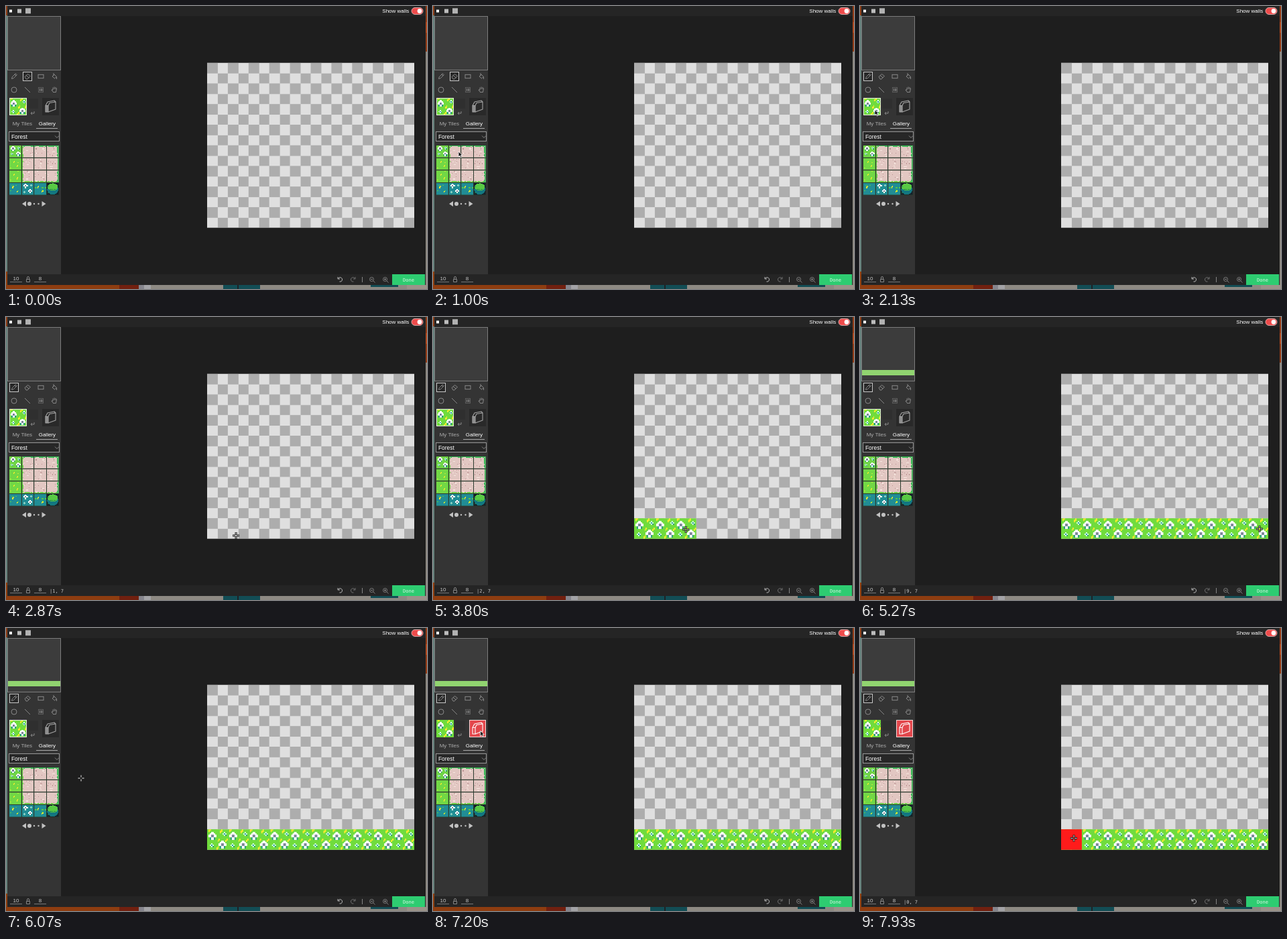
An HTML page that plays this animation: 628 by 422 pixels, repeating every 8 s.

```html
<!DOCTYPE html>
<html lang="en">
<head>
<meta charset="utf-8">
<title>Tile editor</title>
<style>
  html, body { margin: 0; width: 100%; height: 100%; overflow: hidden; background: #1e1e1e; }
  svg { display: block; }
  text { font: 8px "Liberation Sans", Arial, sans-serif; fill: #fff; }
  .mono { font: 7px "DejaVu Sans Mono", monospace; fill: #c4c4c4; }
  .line { fill: none; stroke: #909090; stroke-width: .9; }
  .crisp { shape-rendering: crispEdges; }
</style>
</head>
<body>
<svg width="628" height="422" viewBox="0 0 628 422">
  <defs>
    <symbol id="meadow" viewBox="0 0 16 16" class="crisp"></symbol>
    <pattern id="grass" x="300" y="300.2" width="30.9" height="30.75" patternUnits="userSpaceOnUse">
      <use href="#meadow" width="30.9" height="30.75"/>
    </pattern>
    <pattern id="checker" x="300" y="84.7" width="30.9" height="30.75" patternUnits="userSpaceOnUse">
      <path class="crisp" fill="#adadad" d="M0 0h31v31h-31z"/>
      <path class="crisp" fill="#dfdfdf" d="M15.45 0h15.45v15.375h-15.45zM0 15.375h15.45v15.375h-15.45z"/>
    </pattern>
  </defs>

  <!-- page behind the editor -->
  <g class="crisp">
    <rect width="628" height="422" fill="#8e8a83"/>
    <rect width="2" height="422" fill="#67837e"/>
    <rect width="2" height="14" fill="#8f4019"/>
    <rect y="396" width="2" height="26" fill="#92400f"/>
    <rect y="416" width="169" height="6" fill="#8e3d10"/>
    <rect x="169" y="416" width="29" height="6" fill="#71200f"/>
    <rect x="198" y="416" width="8" height="6" fill="#85858d"/>
    <rect x="206" y="416" width="10" height="6" fill="#a3a3a6"/>
    <rect x="324" y="416" width="55" height="6" fill="#124d55"/>
    <rect x="345" y="416" width="2" height="6" fill="#1d2226"/>
    <rect x="544" y="416" width="41" height="3" fill="#124d55"/>
    <rect x="598" y="416" width="30" height="6" fill="#9b938a"/>
    <rect x="625" width="3" height="68" fill="#943c17"/>
    <rect x="625" y="24" width="3" height="16" fill="#b34b21"/>
  </g>

  <!-- panels -->
  <g class="crisp">
    <rect x="2" width="624" height="416" fill="#1e1e1e"/>
    <rect x="2" width="624" height="15" fill="#252525"/>
    <rect x="2" y="15" width="80" height="385" fill="#343434"/>
    <rect x="2" y="400" width="624" height="16" fill="#252525"/>
    <rect x="2.5" y="15.5" width="79" height="80" fill="#3c3c3c" stroke="#7c7c7c"/>
    <rect id="stripe" x="3" y="79" width="78" height="8" fill="#91d470"/>
  </g>
  <rect x="5" y="5.5" width="4" height="4" fill="#fff"/>
  <rect x="17" y="4.5" width="6" height="6" fill="#bdbdbd"/>
  <rect x="29" y="3.3" width="8" height="8" fill="#b2b2b2"/>
  <text x="561.3" y="10.3">Show walls</text>
  <rect x="605" y="2.5" width="17" height="10" rx="5" fill="#ee4b4b" stroke="#efc4c4" stroke-width=".8"/>
  <circle cx="617" cy="7.5" r="3.4" fill="#fff"/>

  <!-- tools -->
  <rect id="toolBox" class="crisp" y="98.5" width="13" height="13" fill="#282828" stroke="#c8c8c8"/>
  <g class="line">
    <path d="M8.5 108.5l.8-2.8 5-5 2 2-5 5zM13 102l2 2"/>
    <path d="M28 105.500l4.500-4 4 3-4.500 4.500h-2zM30 103.500l4 3.300"/>
    <rect x="48" y="102.300" width="8" height="5.400"/>
    <path d="M69 105l3-3 3.500 3.500-3 2.500zM71 100v4M75.500 106v3"/>
    <circle cx="12" cy="125" r="4"/>
    <path d="M28 121l8 8"/>
    <rect x="48.500" y="121.500" width="7" height="7" stroke-dasharray="1 1"/>
    <path d="M50.500 123v4M52.500 123v4M54 123v4"/>
    <path d="M70 128l-2-3 2 0v-3.500M72 124v-3.500M74 124v-3M70 128.500h4.500l1-6"/>
  </g>

  <!-- current tile and wall -->
  <use href="#meadow" x="5" y="137" width="26" height="26"/>
  <rect id="tileBorder" class="crisp" x="5.500" y="137.500" width="25" height="25" fill="none" stroke="#e6f0dd"/>
  <rect x="33" y="138" width="15" height="15" fill="#2f2f2f"/>
  <path class="line" d="M42 157v3h-5m2-2l-2 2 2 2"/>
  <rect id="wallButton" class="crisp" x="54.500" y="137.500" width="24" height="25"/>
  <g id="wallIcon" stroke-width="1.100" stroke-linejoin="round">
    <path d="M59 148.500h4v9.500h-4z"/>
    <path fill="none" d="M59 148.500l3-5.500 10-2 2 2v11l-11 4M63 148.500l2-4 9-1.500"/>
  </g>

  <!-- gallery -->
  <text x="9.700" y="178" style="fill:#aaa">My Tiles</text>
  <text x="48.700" y="178">Gallery</text>
  <path class="crisp" d="M45 182h32v1h-32z" fill="#aaa"/>
  <rect class="crisp" x="4.500" y="187.500" width="75" height="14" fill="#272727" stroke="#979797"/>
  <text x="8" y="197.600" style="font-size:8.400px">Forest</text>
  <path class="line" d="M73 193.500l3 3 3-3"/>
  <rect x="4.500" y="207.500" width="75" height="75" fill="#2c3a2e"/>
  <g id="gallery" class="crisp"></g>
  <g fill="#c2c2c2">
    <path d="M30 291v8l-6-4zM53.500 291v8l6-4z"/>
    <circle cx="35" cy="295" r="3"/><circle cx="42" cy="295" r="1.200"/><circle cx="48.500" cy="295" r="1.200"/>
  </g>

  <!-- map -->
  <rect x="300" y="84.700" width="309" height="246" fill="url(#checker)"/>
  <rect id="painted" x="300" y="300.200" height="30.500" fill="url(#grass)"/>
  <rect id="wall" x="300" y="300.200" width="30.900" height="30.500" fill="#ff1b1b"/>

  <!-- status bar -->
  <text x="15" y="409" text-anchor="middle" style="fill:#c8c8c8">10</text>
  <text x="51" y="409" text-anchor="middle" style="fill:#c8c8c8">8</text>
  <path class="crisp" d="M6 411h18v1h-18zM42 411h18v1h-18z" fill="#777"/>
  <path class="line" d="M30.500 407.500h5v4h-5zM31.500 407v-2a1.500 1.500 0 0 1 3 0v2"/>
  <text id="cell" class="mono" x="65" y="410.500" xml:space="preserve"></text>
  <g class="line">
    <path stroke="#c8c8c8" d="M495 404v3h3M495.500 406.500a3.200 3.200 0 1 1 2 4.500"/>
    <path stroke="#777" d="M521 404v3h-3M520.500 406.500a3.200 3.200 0 1 0-2 4.500"/>
    <path d="M531.500 404v8"/>
    <g stroke="#888">
      <circle cx="545.500" cy="407.500" r="3"/><path d="M548 410l2.500 2.500M544 407.500h3"/>
      <circle cx="565.500" cy="407.500" r="3"/><path d="M568 410l2.500 2.500M564 407.500h3M565.500 406v3"/>
    </g>
  </g>
  <rect x="576" y="400" width="49" height="16" fill="#2ecc71"/>
  <text class="mono" x="600.500" y="410.500" text-anchor="middle" style="fill:#d9f8e4">Done</text>

  <!-- pointers -->
  <path id="arrow" d="M0 0v8l2-1.800 1.400 2.800 1.400-.7-1.300-2.800h2.500z" fill="#111" stroke="#fff" stroke-width=".8"/>
  <g id="cross" fill="none">
    <path id="crossEdge" stroke="#111" stroke-width="3" d="M-5 0h4M1 0h4M0-5v4M0 1v4"/>
    <path stroke="#eee" d="M-4.500 0h3M1.500 0h3M0-4.500v3M0 1.500v3"/>
  </g>
</svg>
<script>
const $ = id => document.getElementById(id);
const rect = (x, y, w, h, fill) => `<rect x="${x}" y="${y}" width="${w}" height="${h}" fill="${fill}"/>`;

const bigFlower = (x, y) =>
  rect(x - 2, y - 2, 4, 5, '#2b9a80') + rect(x - 1, y - 3, 2, 6, '#fff') + rect(x - 3, y - 1, 6, 2, '#fff') +
  rect(x - 2, y - 2, 4, 3, '#fff') + rect(x - 1, y - 1, 2, 2, '#7c8798');
const smallFlower = (x, y) =>
  rect(x - 1, y, 3, 1, '#d8fff0') + rect(x, y - 1, 1, 3, '#d8fff0') +
  rect(x, y, 1, 1, '#2c9c92') + rect(x + 1, y + 1, 1, 1, '#2b9c68');
const sprig = (x, y) => rect(x, y, 1, 2, '#f6ec2c') + rect(x + 1, y - 1, 1, 2, '#f6ec2c');

$('meadow').innerHTML = rect(0, 0, 16, 16, '#70dc3d') +
  bigFlower(4, 5) + bigFlower(12, 12) + smallFlower(13, 3) + smallFlower(3, 12) +
  sprig(8, 8) + sprig(10, 1) + sprig(1, 0) + sprig(7, 14) + sprig(14, 8);

function seeded(seed) {
  return () => (seed = (seed * 16807) % 2147483647) / 2147483647;
}

function galleryTile(col, row) {
  const random = seeded(91 + col * 37 + row * 311);
  const specks = (n, fill, w = 1) => Array.from({ length: n }, () =>
    rect(1 + Math.floor(random() * 14), 1 + Math.floor(random() * 14), w, 1, fill)).join('');
  if (row === 3) {
    if (col === 3) return rect(0, 0, 16, 16, '#16222a') +
      '<ellipse cx="8" cy="9" rx="7.5" ry="6.500" fill="#137780"/><ellipse cx="8" cy="5.500" rx="7" ry="5" fill="#58c944"/>' +
      specks(6, '#238a50', 2);
    return rect(0, 0, 16, 16, '#218d95') + (col === 1
      ? bigFlower(5, 4) + bigFlower(11, 11) + smallFlower(12, 3) + smallFlower(3, 12)
      : sprig(4, 5) + sprig(10, 11) + specks(4, '#55c947', 2));
  }
  if (col === 0) return row === 0
    ? rect(0, 0, 16, 16, '#70d448') + bigFlower(5, 4) + bigFlower(12, 11) + smallFlower(12, 3) + smallFlower(3, 11)
    : rect(0, 0, 16, 16, '#72d845') + sprig(5, 5) + sprig(10, 10) + specks(2, '#c0e83a', 2);
  let art = rect(0, 0, 16, 16, '#e2c7c2') + specks(6, '#b98f90') + specks(4, '#f6e6df', 2);
  for (let i = 0; i < 16; i += 2) {
    const depth = 1 + Math.round(random());
    if (row === 0) art += rect(i, 0, 2, depth, '#3cba58');
    if (row === 2) art += rect(i, 16 - depth, 2, depth, '#68cf45');
    if (col === 1) art += rect(0, i, depth, 2, '#68cf45');
    if (col === 3) art += rect(16 - depth, i, depth, 2, '#3cba58');
  }
  return art;
}

let tiles = '';
for (let row = 0; row < 4; row++)
  for (let col = 0; col < 4; col++)
    tiles += `<svg x="${5 + col * 18.6}" y="${208 + row * 18.6}" width="17.8" height="17.8" viewBox="0 0 16 16">${galleryTile(col, row)}</svg>`;
$('gallery').innerHTML = tiles;

const LOOP = 8000, LEFT = 300, TOP = 84.7, CELL_W = 30.9, CELL_H = 30.75;
const PAINT = 3500, RELEASE = 5250, PENCIL = 1700, WALL_MODE = 7060, WALL = 7900;

// time, x, y, linear?
const path = [
  [500, -10, 262], [920, 38, 217], [1180, 38, 217], [1650, 12, 105], [1800, 12, 105],
  [2080, 22, 155], [2220, 22, 155], [2620, 357, 330], [3300, 312, 317], [3500, 316, 317],
  [3800, 377, 317, 1], [4600, 527, 316, 1], [5000, 596, 316, 1], [5270, 596, 316],
  [6070, 112, 224], [6850, 65, 151], [7150, 65, 151], [7780, 362, 274], [7930, 319, 313.5], [8000, 319, 313.5]
];

function pointerAt(t) {
  const i = path.findIndex(p => p[0] > t);
  const [t0, x0, y0] = path[i - 1], [t1, x1, y1, linear] = path[i];
  const u = (t - t0) / (t1 - t0), k = linear ? u : u * u * (3 - 2 * u);
  return [x0 + (x1 - x0) * k, y0 + (y1 - y0) * k];
}

const show = (id, on) => $(id).setAttribute('visibility', on ? 'inherit' : 'hidden');
const set = (id, name, value) => $(id).setAttribute(name, value);

function draw(t) {
  const [x, y] = t < path[0][0] ? [-10, 262] : pointerAt(t);
  const col = Math.floor((x - LEFT) / CELL_W), row = Math.floor((y - TOP) / CELL_H);
  const onMap = col >= 0 && col < 10 && row >= 0 && row < 8;
  const wallMode = t >= WALL_MODE;

  show('arrow', x < 82);
  show('cross', x >= 82);
  show('crossEdge', onMap);
  for (const id of ['arrow', 'cross']) set(id, 'transform', `translate(${x.toFixed(1)} ${y.toFixed(1)})`);
  $('cell').textContent = onMap ? `|${col}, ${row}` : '';

  set('toolBox', 'x', t < PENCIL ? 25.5 : 5.5);
  show('tileBorder', !wallMode);
  set('wallButton', 'fill', wallMode ? '#e3474c' : '#292929');
  set('wallButton', 'stroke', wallMode ? '#f3d6d6' : '#292929');
  set('wallIcon', 'stroke', wallMode ? '#fff' : '#a5a5a5');
  set('wallIcon', 'fill', wallMode ? '#e3474c' : '#8a8a8a');

  const count = t < PAINT ? 0 : t < RELEASE ? Math.min(10, col + 1) : 10;
  set('painted', 'width', count * CELL_W);
  show('stripe', t >= RELEASE);
  show('wall', t >= WALL);
}

const start = performance.now();
function tick() {
  draw((performance.now() - start) % LOOP);
  requestAnimationFrame(tick);
}
tick();
</script>
</body>
</html>
```
